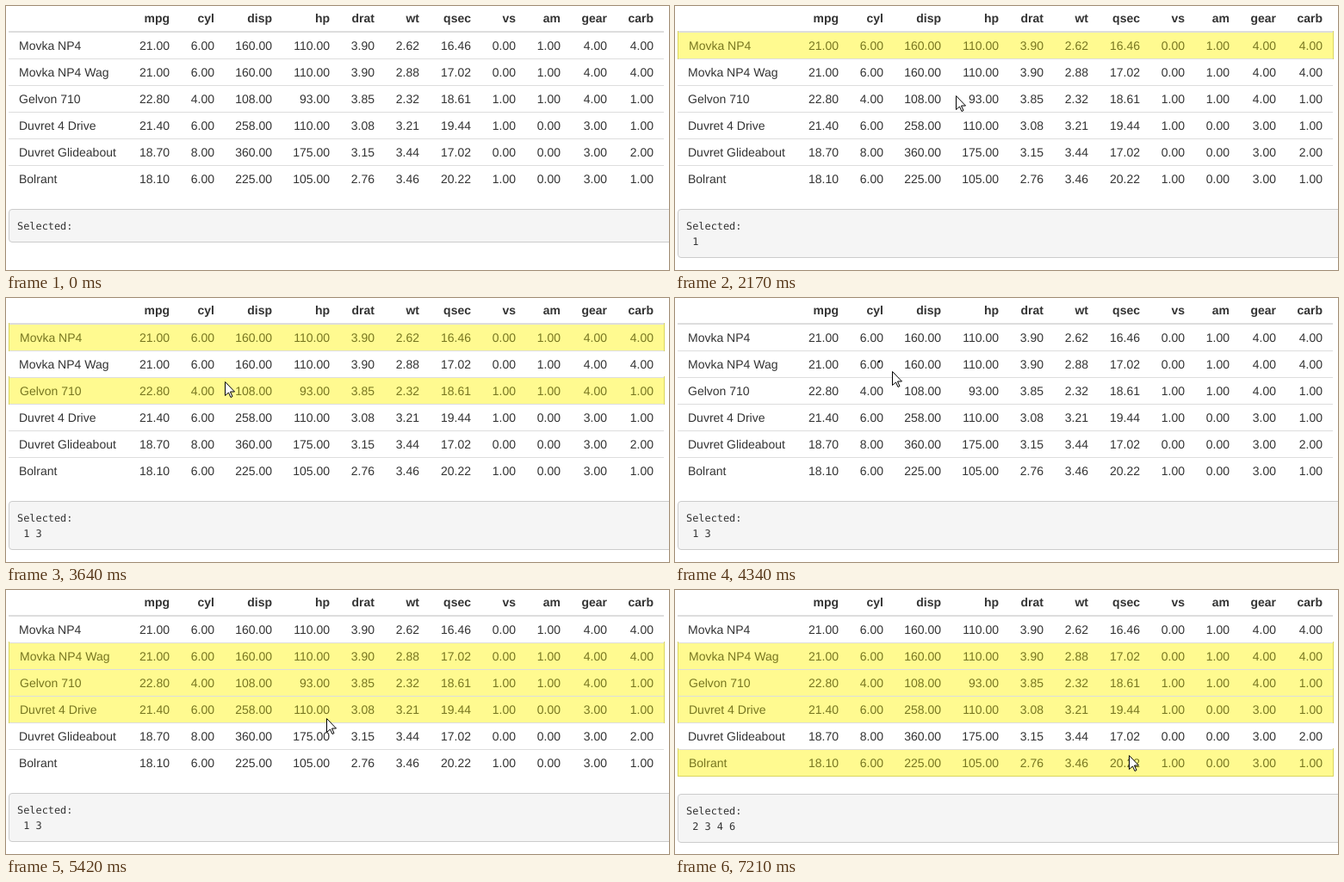
An HTML page with a canvas for the animation above (7.44 s loop, 770 by 307 pixels).

```html
<!DOCTYPE html>
<html lang="en">
<head>
<meta charset="utf-8">
<title>Selectable table</title>
<style>
  html, body { margin: 0; width: 100%; height: 100%; overflow: hidden; background: #fff; }
  canvas { display: block; }
</style>
</head>
<body>
<canvas id="stage" width="770" height="307"></canvas>
<script>
const ctx = document.getElementById('stage').getContext('2d');
ctx.textRendering = 'geometricPrecision';

const LOOP = 7440, STEP = 77, REPORT_LAG = 70;
const LEFT = 3, EDGE = 764, TOP = 30, ROW = 31;
const BODY = '14px "Liberation Sans", Arial, sans-serif';
const HEAD = 'bold ' + BODY;
const MONO = '11.9px "DejaVu Sans Mono", monospace';

const heads = 'mpg cyl disp hp drat wt qsec vs am gear carb'.split(' ');
const rows = `Movka NP4: 21 6 160 110 3.9 2.62 16.46 0 1 4 4
Movka NP4 Wag: 21 6 160 110 3.9 2.88 17.02 0 1 4 4
Gelvon 710: 22.8 4 108 93 3.85 2.32 18.61 1 1 4 1
Duvret 4 Drive: 21.4 6 258 110 3.08 3.21 19.44 1 0 3 1
Duvret Glideabout: 18.7 8 360 175 3.15 3.44 17.02 0 0 3 2
Bolrant: 18.1 6 225 105 2.76 3.46 20.22 1 0 3 1`.split('\n').map(line => {
  const [name, values] = line.split(': ');
  return { name, cells: values.split(' ').map(v => Number(v).toFixed(2)) };
});

// Each column is as wide as its widest entry plus padding.
function textWidth(str, font) {
  ctx.font = font;
  return ctx.measureText(str).width;
}
const rights = [];
heads.forEach((head, c) => {
  const widths = rows.map(row => textWidth(row.cells[c], BODY));
  const widest = Math.ceil(Math.max(textWidth(head, HEAD), ...widths));
  rights.push(c ? rights[c - 1] + widest + 24 : 190);
});

// Highlighted rows from each time on; the report follows a little later.
const picks = [[0, ''], [1390, '1'], [2780, '13'], [4270, ''], [5420, '234'], [7140, '2346']];

const ENTRY = { x: 564, y: 237 };
// A text cursor shows from the end of a move until the press.
const moves = [
  { start: 290, end: 1000, x: 344, y: 54, press: 1260 },
  { start: 1690, end: 2170, x: 326, y: 104 },
  { start: 3350, end: 3640, x: 254, y: 97 },
  { start: 3640, end: 3950, x: 237, y: 77, press: 4270 },
  { start: 4270, end: 4960, x: 372, y: 149 },
  { start: 5510, end: 5580, x: 400, y: 139 },
  { start: 6120, end: 6430, x: 541, y: 218 },
  { start: 6430, end: 6660, x: 527, y: 192, press: 7140 },
];
const lasso = { start: 4270, end: 5420, x: 236, y: 73 };

const rowsAt = t => picks.filter(([time]) => time <= t).pop()[1];

function reportAt(t) {
  const last = picks.filter(([time, set]) => set && time + REPORT_LAG <= t).pop();
  return last ? last[1].split('').join(' ') : '';
}

function pointerAt(t) {
  const i = moves.findLastIndex(move => move.start <= t);
  if (i < 0) return null;
  const to = moves[i], from = moves[i - 1] || ENTRY;
  const span = to.end - to.start;
  const steps = Math.round(span / STEP);
  const p = Math.round(Math.min(1, (t - to.start) / span) * steps) / steps;
  return {
    x: Math.round(from.x + (to.x - from.x) * p),
    y: Math.round(from.y + (to.y - from.y) * p),
    beam: t >= to.end && t < to.press,
  };
}

function rect(color, x, y, w, h) {
  ctx.fillStyle = color;
  ctx.fillRect(x, y, w, h);
}

function text(str, x, y, font, color = '#333', align = 'left') {
  ctx.font = font;
  ctx.fillStyle = color;
  ctx.textAlign = align;
  ctx.fillText(str, x, y);
}

function drawTable(picked) {
  heads.forEach((head, c) => text(head, rights[c], 19, HEAD, '#333', 'right'));
  rows.forEach(({ name, cells }, r) => {
    const y = TOP + ROW * r;
    const on = picked.includes(r + 1);
    const color = on ? '#777620' : '#333';
    if (on) rect('#fffa90', LEFT, y, EDGE - LEFT, ROW);
    rect('#ddd', LEFT, r ? y : y - 1, EDGE - LEFT, r ? 1 : 2);
    text(name, on ? 16 : 15, y + 21, BODY, color);
    cells.forEach((cell, c) => text(cell, rights[c], y + 21, BODY, color, 'right'));
  });
  for (const row of picked) {
    const y = TOP + ROW * (row - 1);
    for (const x of [LEFT, EDGE]) rect('#dad55e', x, y - 1, 1, ROW + 2);
    if (row == rows.length) rect('#dad55e', LEFT, y + ROW, EDGE - LEFT + 1, 1);
  }
}

function drawReport(report, top) {
  ctx.beginPath();
  ctx.roundRect(LEFT + 0.5, top + 0.5, 780, report ? 56 : 38, 3.5);
  ctx.fillStyle = '#f5f5f5';
  ctx.fill();
  ctx.strokeStyle = '#ccc';
  ctx.stroke();
  text('Selected:', 13, top + 24, MONO);
  text(' ' + report, 13, top + 42, MONO);
}

// The dotted box trails the pointer by one step.
function drawLasso(t) {
  if (t < lasso.start + STEP) return rect('#000', lasso.x, lasso.y, 2, 2);
  const { x, y } = pointerAt(t - STEP);
  ctx.strokeStyle = '#000';
  ctx.setLineDash([1, 1]);
  ctx.strokeRect(lasso.x + 0.5, lasso.y + 0.5, x - lasso.x, y - lasso.y);
  ctx.setLineDash([]);
}

function drawBeam(x, y) {
  for (const end of [y - 7, y + 8]) {
    rect('#000', x - 1, end, 3, 1);
    rect('#000', x + 3, end, 3, 1);
  }
  rect('#000', x + 2, y - 6, 1, 14);
}

function drawArrow(x, y) {
  ctx.save();
  ctx.translate(x + 0.5, y + 0.5);
  const arrow = new Path2D('M0 0V16L4 12.5L6.5 18L8.5 17L6 11.5H11Z');
  ctx.fillStyle = '#fff';
  ctx.fill(arrow);
  ctx.strokeStyle = '#000';
  ctx.lineJoin = 'round';
  ctx.stroke(arrow);
  ctx.restore();
}

function draw(t) {
  const picked = rowsAt(t);
  rect('#fff', 0, 0, 770, 307);
  drawTable(picked);
  drawReport(reportAt(t), picked.includes(rows.length) ? 237 : 236);
  if (t >= lasso.start && t < lasso.end) drawLasso(t);
  const pointer = pointerAt(t);
  if (pointer) (pointer.beam ? drawBeam : drawArrow)(pointer.x, pointer.y);
}

const begin = performance.now();
function tick() {
  draw((performance.now() - begin) % LOOP);
  requestAnimationFrame(tick);
}
tick();
</script>
</body>
</html>
```
